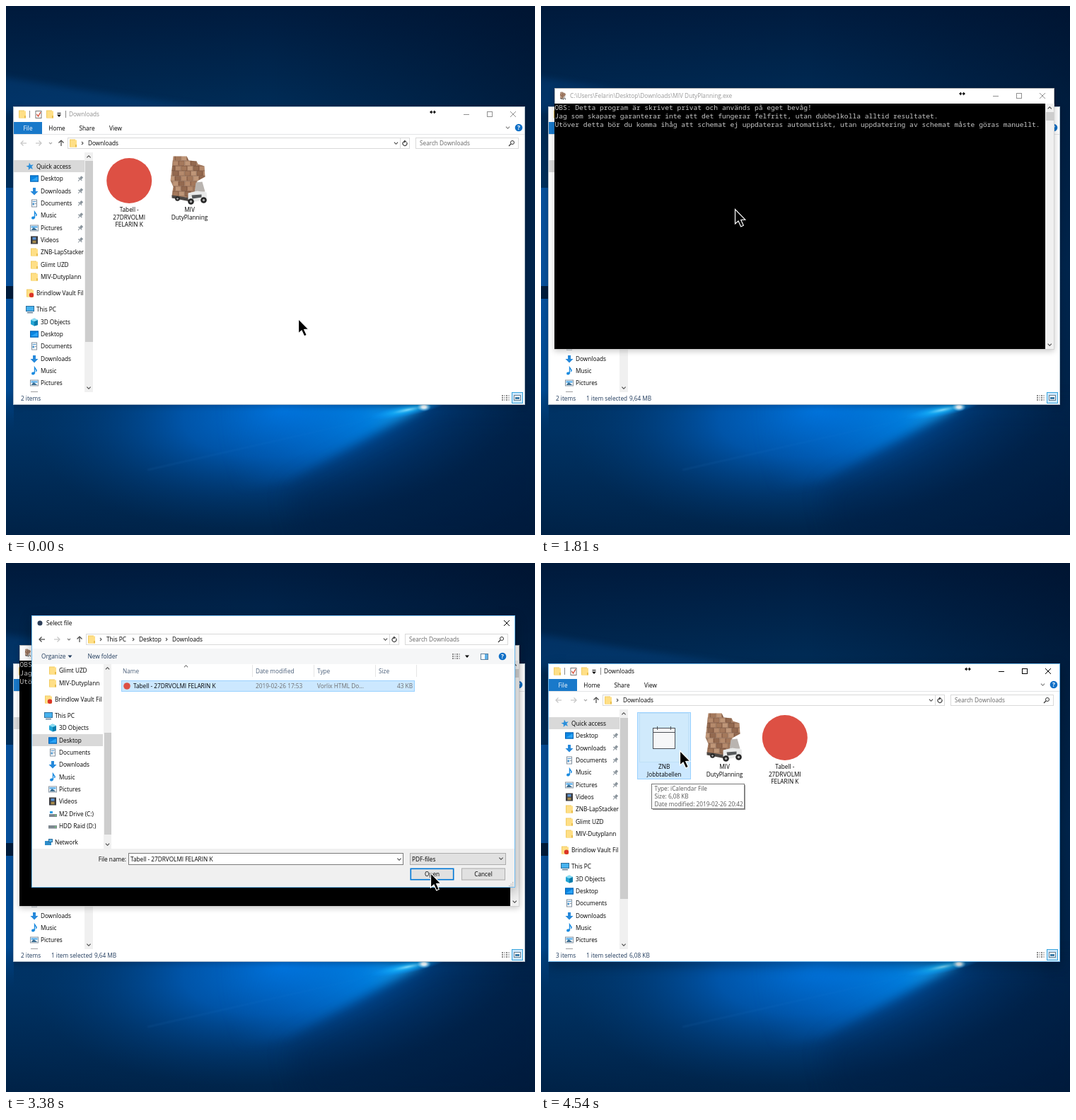
These frames come from a looping animation (748 px wide and 748 px high, 5710 ms). An HTML page with a canvas:

```html
<!DOCTYPE html>
<html lang="en">
<head>
<meta charset="utf-8">
<title>Downloads</title>
<style>
html, body { margin: 0; width: 100%; height: 100%; overflow: hidden; background: #001a3c; }
canvas { display: block; width: 748px; height: 748px; }
</style>
</head>
<body>
<canvas id="stage" width="748" height="748"></canvas>
<script>
const SIZE = 748, LOOP = 5710, STEP = 30;
const UI = '8.25px "Open Sans", "Noto Sans", sans-serif';
const MONO = '9.62px "Noto Sans Mono", "DejaVu Sans Mono", monospace';
const DOC = 'Tabell - 27DRVOLMI FELARIN K';
const SELECT = ['#cce8ff', '#99d1ff'], HOVER = ['#e5f3ff', '#e5f3ff'];
const INK = '#000', GREY = '#8f8f8f', ACCENT = '#6db9ee';
let ctx = document.getElementById('stage').getContext('2d');

// ---- drawing helpers ----
function rect(x, y, w, h, fill, stroke, lw = 1) {
  if (fill) { ctx.fillStyle = fill; ctx.fillRect(x, y, w, h); }
  if (stroke) {
    ctx.strokeStyle = stroke; ctx.lineWidth = lw;
    ctx.strokeRect(x + lw / 2, y + lw / 2, w - lw, h - lw);
  }
}
function trace(points, close) {
  ctx.beginPath();
  points.forEach(([x, y]) => ctx.lineTo(x, y));
  if (close) ctx.closePath();
}
function poly(points, fill) { trace(points, true); ctx.fillStyle = fill; ctx.fill(); }
function line(points, color, width = 1) {
  trace(points); ctx.strokeStyle = color; ctx.lineWidth = width; ctx.stroke();
}
function disc(x, y, r, fill) {
  ctx.beginPath(); ctx.arc(x, y, r, 0, 7); ctx.fillStyle = fill; ctx.fill();
}
function text(s, x, y, color = INK, align = 'left', font = UI) {
  ctx.font = font; ctx.fillStyle = color; ctx.textAlign = align;
  ctx.fillText(s, x, Math.round(y + 3));
}
function at(x, y, draw, angle = 0, scale = 1) {
  ctx.save(); ctx.translate(x, y); ctx.rotate(angle); ctx.scale(scale, scale); draw(); ctx.restore();
}
function clipTo(x, y, w, h, draw) {
  ctx.save(); ctx.beginPath(); ctx.rect(x, y, w, h); ctx.clip(); draw(); ctx.restore();
}
function chevron(x, y, turns = 0, color = '#444', r = 2.6) {
  at(x, y, () => line([[-r, -r / 2], [0, r / 2], [r, -r / 2]], color, 1.1), turns * Math.PI / 2);
}
function arrow(x, y, turns, color) {
  at(x, y, () => {
    line([[-4, 0], [4, 0]], color, 1.2);
    line([[-.5, -3.5], [-4, 0], [-.5, 3.5]], color, 1.2);
  }, turns * Math.PI / 2);
}
function triangle(x, y, color = INK) { poly([[x - 3, y - 1.5], [x + 3, y - 1.5], [x, y + 2]], color); }
function panel(x, y, w, h, border, strong) {
  ctx.save();
  ctx.shadowColor = `rgba(0,0,0,${strong ? .3 : .22})`;
  ctx.shadowBlur = strong ? 16 : 8;
  ctx.shadowOffsetY = strong ? 5 : 2;
  rect(x, y, w, h, '#fff');
  ctx.restore();
  rect(x, y, w, h, null, border);
}

// ---- wallpaper ----
function gradient(g, stops) { stops.forEach(([p, c]) => g.addColorStop(p, c)); return g; }
function glow(x, y, rx, ry, angle, stops) {
  at(x, y, () => {
    ctx.scale(1, ry / rx);
    ctx.fillStyle = gradient(ctx.createRadialGradient(0, 0, 0, 0, 0, rx), stops);
    ctx.fillRect(-rx, -rx, 2 * rx, 2 * rx);
  }, angle);
}
function beam(points, fill, blur) {
  ctx.filter = `blur(${blur}px)`; poly(points, fill); ctx.filter = 'none';
}
function paintWallpaper() {
  ctx.fillStyle = gradient(ctx.createLinearGradient(0, 0, 0, SIZE),
    [[0, '#001b3e'], [.18, '#002b55'], [.5, '#003a70'], [.8, '#00366a'], [1, '#00244a']]);
  ctx.fillRect(0, 0, SIZE, SIZE);
  ctx.fillStyle = gradient(ctx.createLinearGradient(0, 0, SIZE, 0),
    [[0, 'rgba(0,15,40,.1)'], [.5, 'rgba(0,15,40,0)'], [1, 'rgba(0,14,38,.5)']]);
  ctx.fillRect(0, 0, SIZE, SIZE);
  beam([[-20, 98], [130, 122], [330, 150], [-20, 150]], 'rgba(10,90,170,.26)', 5);

  glow(390, 570, 350, 165, -.12, [[0, 'rgba(0,116,222,.95)'], [.4, 'rgba(0,98,196,.7)'], [.75, 'rgba(0,74,150,.28)'], [1, 'rgba(0,60,120,0)']]);
  const fan = gradient(ctx.createRadialGradient(592, 567, 0, 592, 567, 290),
    [[0, 'rgba(40,190,255,.9)'], [.3, 'rgba(0,150,255,.6)'], [.65, 'rgba(0,125,235,.3)'], [1, 'rgba(0,100,200,0)']]);
  beam([[594, 566], [300, 555], [300, 690], [400, 670]], fan, 7);
  beam([[610, 570], [400, 685], [420, 770], [770, 770], [770, 570]], 'rgba(0,32,70,.3)', 16);
  beam([[592, 567], [200, 655], [200, 657]], 'rgba(80,180,255,.1)', 1);
  glow(568, 571, 56, 9, -.2, [[0, '#7fdcff'], [.4, 'rgba(20,180,255,.6)'], [1, 'rgba(0,140,255,0)']]);
  glow(591, 567, 10, 6, 0, [[0, '#fff'], [.3, '#e6f7ff'], [1, 'rgba(120,210,255,0)']]);

  rect(0, 257, 11, 139, '#07509b');
  rect(0, 396, 11, 18, '#001c3c');
  ctx.fillStyle = gradient(ctx.createLinearGradient(0, 414, 0, 600), [[0, '#06519d'], [.7, '#004a92'], [1, 'rgba(0,60,120,0)']]);
  ctx.fillRect(0, 414, 11, 186);
}
const wallpaper = document.createElement('canvas');
wallpaper.width = wallpaper.height = SIZE;
const stageCtx = ctx;
ctx = wallpaper.getContext('2d');
paintWallpaper();
ctx = stageCtx;

// ---- small icons, drawn around the origin ----
const icons = {
  folder() { rect(-5, -5.5, 8, 11, '#f2cc62'); rect(-4, -4.5, 9, 10, '#ffdf86'); rect(3, 2, 2, 3.5, '#e9bd4d'); },
  star() {
    poly(Array.from({ length: 10 }, (_, i) => {
      const r = i % 2 ? 2.3 : 5.5, a = i * Math.PI / 5 - .2;
      return [r * Math.sin(a), -r * Math.cos(a)];
    }), '#2b8fdb');
  },
  desktop() { rect(-6, -4.5, 12, 9, '#0a84e0', '#0764b4'); poly([[-5, 3], [5, -3], [5, 3]], '#2ba3f5'); },
  down() { poly([[-2, -5], [2, -5], [2, 0], [5.5, 0], [0, 5.5], [-5.5, 0], [-2, 0]], '#2689db'); },
  doc() {
    rect(-4, -5.5, 8, 11, '#fff', '#83919f');
    rect(-2.5, -3, 5, 1, '#4d94cc'); rect(-2.5, -.5, 2.5, 3, '#4d94cc'); rect(.8, 0, 2, 1, '#83919f');
  },
  music() {
    ctx.fillStyle = '#1a8be0';
    ctx.beginPath(); ctx.ellipse(-1.5, 3.5, 2.5, 2, -.3, 0, 7); ctx.fill();
    line([[.5, 3.5], [.5, -5], [3.2, -1], [2.5, 1]], '#1a8be0', 1.4);
  },
  picture() { rect(-6, -4.5, 12, 9, '#fff', '#8996a3'); rect(-4.5, -3, 9, 3, '#76bdf0'); poly([[-4.5, 3], [-1, -1], [4.5, 3]], '#3b6d91'); },
  video() { rect(-5, -5.5, 10, 11, '#3c3c40'); rect(-2.5, -4, 5, 3.5, '#5b94d2'); rect(-2.5, .7, 5, 3.5, '#a78b4a'); },
  cube() { poly([[-5, -3], [0, -5.5], [5, -3], [5, 4], [0, 5.5], [-5, 3]], '#23a5d5'); poly([[0, -1], [5, -3], [5, 4], [0, 5.5]], '#0c7cab'); poly([[-5, -3], [0, -5.5], [5, -3], [0, -1]], '#8bdcf2'); },
  pc() { rect(-6, -5, 12, 8, '#47b2ee', '#2b6f9e'); rect(-4, 4, 8, 1.3, '#53718a'); },
  disk() { rect(-5, 0, 11, 4, '#7d8790'); rect(3, 1.3, 2, 1.3, '#6ee36c'); rect(-4, -4, 4, 3, '#28a0e8'); },
  raid() { rect(-6, -1, 12, 4.5, '#7d8790'); rect(3, .5, 2, 1.3, '#6ee36c'); },
  network() { rect(-5, -2, 9, 6, '#2d8cc9'); rect(0, -5, 6, 5, '#5cb8ee', '#2c6d9b'); },
  synced() { icons.folder(); disc(2, 2.8, 3.2, '#da3327'); }
};
function icon(kind, x, y) { at(x, y, icons[kind]); }

// A cart loaded with parcels, 52 x 70 around the origin.
function cart() {
  const shades = ['#b58a6c', '#a4785b', '#bf9678', '#93694f'];
  ctx.save();
  trace([[-22, -34], [-3, -34], [0, -28], [11, -27], [13, -23], [22, -20], [23, -5], [12, 1], [10, 16], [2, 28], [-24, 22], [-22, 9], [-26, 0], [-24, -16]], true);
  ctx.clip();
  for (let row = 0; row < 9; row++) {
    for (let col = 0; col < 7; col++) {
      const x = -28 + col * 8.5 - (row % 2) * 3.5, y = -35 + row * 7.2;
      rect(x, y, 8.5, 7.2, shades[(row * 3 + col * 5 + (row >> 1)) % 4], 'rgba(95,60,42,.45)', .7);
    }
  }
  ctx.restore();
  poly([[10, 3], [19, 2], [23, 16], [8, 17]], '#b9b4b0');
  poly([[-24, 21], [2, 25], [2, 30], [-24, 25]], '#4b4643');
  poly([[-1, 18], [12, 15], [25, 17], [26, 27], [4, 31], [-1, 27]], '#e9eaea');
  poly([[4, 21], [18, 20], [18, 24], [5, 26]], '#55585a');
  [[-16, 26, 3.3], [3, 30, 4.3], [21, 28, 4.3]].forEach(([x, y, r]) => { disc(x, y, r, '#252525'); disc(x, y, r * .4, '#aaa'); });
}

// ---- shared window parts ----
function magnifier(x, y) {
  ctx.beginPath(); ctx.arc(x + 1, y - 1, 2.5, 0, 7);
  ctx.strokeStyle = '#333'; ctx.lineWidth = 1; ctx.stroke();
  line([[x - 1, y + 1], [x - 4, y + 4]], '#333', 1.3);
}
function help(x, y) { disc(x, y, 5.3, '#0f6fc6'); text('?', x, y, '#fff', 'center', 'bold ' + UI); }
function refresh(x, y) {
  ctx.beginPath(); ctx.arc(x, y + .5, 3, -.7, 4.4);
  ctx.strokeStyle = '#444'; ctx.lineWidth = 1.1; ctx.stroke();
  poly([[x - 1, y - 4.5], [x + 2.5, y - 2.5], [x - 1, y - .5]], '#444');
}
function closeMark(x, y, color) {
  line([[x - 4, y - 4], [x + 4, y + 4]], color); line([[x + 4, y - 4], [x - 4, y + 4]], color);
}
function windowButtons(x, y, color) {
  line([[x - 4, y + .5], [x + 4, y + .5]], color);
  rect(x + 29, y - 4, 8, 8, null, color);
  closeMark(x + 66, y, color);
  const rx = x - 47.5, ry = y - 3;
  line([[rx - 3, ry], [rx + 3, ry]], '#000');
  poly([[rx - 4.5, ry], [rx - 1.5, ry - 2.5], [rx - 1.5, ry + 2.5]], '#000');
  poly([[rx + 4.5, ry], [rx + 1.5, ry - 2.5], [rx + 1.5, ry + 2.5]], '#000');
}
function scrollBar(x, top, bottom, thumbTop, thumbBottom, w = 12) {
  rect(x, top, w, bottom - top, '#f0f0f0');
  rect(x + 1, thumbTop, w - 1, thumbBottom - thumbTop, '#cdcdcd');
  chevron(x + w / 2, top + 6, 2); chevron(x + w / 2, bottom - 6);
}
function listView(x, y) {
  for (let row = 0; row < 3; row++) {
    for (let col = 0; col < 2; col++) {
      rect(x + col * 6, y + row * 3, 2, 2, '#8a8a8a');
      rect(x + col * 6 + 3, y + row * 3 + .5, 2, 1, '#8a8a8a');
    }
  }
}
function addressBar(x, y, right, searchX, searchRight, path) {
  rect(x, y - 8, right - x, 16, '#fff', '#d9d9d9');
  icon('folder', x + 8, y);
  path.forEach(([label, px]) => { chevron(px - 8, y, 3, '#555', 2); text(label, px, y); });
  chevron(right - 19.5, y);
  line([[right - 13.5, y - 8], [right - 13.5, y + 8]], '#d9d9d9');
  refresh(right - 7, y);
  rect(searchX, y - 8, searchRight - searchX, 16, '#fff', '#d9d9d9');
  text('Search Downloads', searchX + 6, y, '#666');
  magnifier(searchRight - 10, y);
}

const PITCH = 17.37;
const group = (top, head, children) => [
  { kind: head[0], label: head[1], y: top, dx: 0 },
  ...children.map(([kind, label, pin], i) => ({ kind, label, pin, y: top + PITCH * (i + 1), dx: 6 }))
];
const places = [
  ...group(226.8, ['star', 'Quick access'], [
    ['desktop', 'Desktop', 1], ['down', 'Downloads', 1], ['doc', 'Documents', 1], ['music', 'Music', 1],
    ['picture', 'Pictures', 1], ['video', 'Videos', 1],
    ['folder', 'ZNB-LapStacker'], ['folder', 'Glimt UZD'], ['folder', 'MIV-Dutyplann']]),
  ...group(406.2, ['synced', 'Brindlow Vault Fil'], []),
  ...group(429.2, ['pc', 'This PC'], [
    ['cube', '3D Objects'], ['desktop', 'Desktop'], ['doc', 'Documents'], ['down', 'Downloads'], ['music', 'Music'],
    ['picture', 'Pictures'], ['video', 'Videos'], ['disk', 'M2 Drive (C:)'], ['raid', 'HDD Raid (D:)']]),
  ...group(608.5, ['network', 'Network'], [])
];
function sidebar(x, top, bottom, dx, dy, markedY) {
  clipTo(x, top, 100, bottom - top, () => {
    rect(x, Math.round(markedY - 8.5), 101, 17, '#d9d9d9');
    for (const p of places) {
      const y = p.y + dy;
      icon(p.kind, 34 + dx + p.dx, Math.round(y));
      text(p.label, 43 + dx + p.dx, y);
      if (p.pin) at(105 + dx, y, () => {
        rect(-1.5, -4, 3.5, 4, '#8a949c'); rect(-3, 0, 6.5, 1.2, '#8a949c'); line([[0, 1], [0, 4.5]], '#8a949c');
      }, .7);
    }
  });
}

// ---- file manager ----
const pdfItem = { lines: ['Tabell -', '27DRVOLMI', 'FELARIN K'], draw: x => disc(x, 247, 32, '#dd5044') };
const appItem = { lines: ['MIV', 'DutyPlanning'], draw: x => at(x - 1, 246.5, cart) };
const calendarItem = {
  lines: ['ZNB', 'Jobbtabellen'],
  draw(center, marked) {
    const x = Math.round(center), tone = '#4a4f55';
    rect(x - 35, 212, 70, 70, marked ? '#d0eafc' : '#fff', marked ? '#bfe0f6' : '#dedede');
    rect(x - 16, 233, 32, 30, '#f6f7f8', tone);
    line([[x - 16, 239.5], [x + 16, 239.5]], tone);
    [-9.5, 9.5].forEach(d => line([[x + d, 231], [x + d, 236]], tone));
  }
};
function explorer({ active, items, selected, hovered, size }) {
  const tools = selected >= 0 && items[selected] === appItem;
  const tone = active ? '#000' : GREY;
  panel(10, 142, 724, 422, active ? ACCENT : '#b4c3cf', active);

  icon('folder', 23, 153);
  rect(33, 148, 1, 10, '#888');
  rect(41.5, 148, 9, 11, '#fff', '#777'); line([[43.5, 153], [45.5, 156], [49, 150]], '#d2462f', 1.3);
  icon('folder', 62, 153);
  line([[72.5, 151.5], [77.5, 151.5]], INK); triangle(75, 155);
  rect(84, 148, 1, 10, '#888');
  if (tools) {
    rect(176, 144, 74, 20, '#efcdfc');
    line([[176.5, 164], [176.5, 176]], '#e4e4e4'); line([[249.5, 164], [249.5, 176]], '#e4e4e4');
    text('Application Tools', 213, 154.5, '#6b3c7a', 'center');
    text('Manage', 212, 173, INK, 'center');
  }
  text('Downloads', tools ? 259 : 89, 153, tone);
  windowButtons(651, 153, tone);

  rect(11, 164, 40, 17, '#1979ca');
  text('File', 31, 173, '#fff', 'center');
  [['Home', 72], ['Share', 114.5], ['View', 155]].forEach(([s, x]) => text(s, x, 173, INK, 'center'));
  rect(11, 181, 722, 1, '#e3e4e6');
  chevron(709.5, 172, 0, '#777'); help(725, 172);

  arrow(25, 194, 0, '#c5c5c5'); arrow(46, 194, 2, '#c5c5c5'); chevron(63, 194, 0, '#aaa', 2); arrow(78, 194, 1, '#444');
  addressBar(87, 194, 571, 579, 725, [['Downloads', 116]]);

  sidebar(11, 207, 546, 0, 0, 226.8);
  scrollBar(111, 207, 546, 219, 475);

  items.forEach((item, i) => {
    const x = 174.2 + i * 85.3, tint = i === selected ? SELECT : i === hovered ? HOVER : null;
    if (tint) rect(Math.round(x - 37.8), 211, 76, 95, ...tint);
    item.draw(x, !!tint);
    item.lines.forEach((s, n) => text(s, x, 288 + n * 10.7, INK, 'center'));
  });

  text(items.length + ' items', 21, 555, '#1e395b');
  if (selected >= 0) { text('1 item selected', 64, 555, '#1e395b'); text(size, 125, 555, '#1e395b'); }
  listView(701, 550);
  rect(715, 546, 16, 16, '#cce8ff', '#37a3dc');
  rect(718, 550, 10, 8, '#fff', '#667c8c'); rect(720, 553, 6, 3, '#3b7ba7');
}
function tooltip() {
  rect(158, 314, 131, 35, 'rgba(0,0,0,.4)');
  rect(156, 312, 132, 36, '#fff', '#767676');
  ['Type: iCalendar File', 'Size: 6,08 KB', 'Date modified: 2019-02-26 20:42']
    .forEach((s, i) => text(s, 160.5, 319 + i * 10.8, '#575757'));
}

// ---- console ----
function consoleWindow() {
  panel(19, 116, 707, 369.5, '#b4b4b4', false);
  at(31, 127, cart, 0, .16);
  text('C:\\Users\\Felarin\\Desktop\\Downloads\\MIV DutyPlanning.exe', 41, 127, '#999');
  windowButtons(643, 127, GREY);
  rect(19, 138, 694, 347, '#000');
  ['OBS: Detta program är skrivet privat och används på eget bevåg!',
    'Jag som skapare garanterar inte att det fungerar felfritt, utan dubbelkolla alltid resultatet.',
    'Utöver detta bör du komma ihåg att schemat ej uppdateras automatiskt, utan uppdatering av schemat måste göras manuellt.']
    .forEach((s, i) => text(s, 19.5, 144.4 + i * 11.6, '#c8c8c8', 'left', MONO));
  scrollBar(713, 138, 485, 150, 162, 12.5);
}

// ---- file dialog ----
function dialog(chosen, settled) {
  const steel = '#4c607a', navy = '#1e395b';
  panel(36, 74, 684, 385, ACCENT, settled);
  disc(48, 85, 3.5, '#2c3e58');
  text('Select file', 57, 85);
  closeMark(708, 85, '#000');
  arrow(51, 108, 0, '#444'); arrow(72, 108, 2, '#c5c5c5'); chevron(89, 108, 0, '#777', 2); arrow(104, 108, 1, '#444');
  addressBar(113, 108, 556, 564, 710, [['This PC', 142], ['Desktop', 188], ['Downloads', 235]]);

  rect(37, 121, 682, 22, '#f5f6f7');
  text('Organize', 50, 132, navy); triangle(90.5, 132, navy);
  text('New folder', 115.5, 132, navy);
  listView(631, 128);
  triangle(652, 132);
  rect(671, 128, 11, 9, '#fff', '#5e7f9a'); rect(677, 129, 4, 7, '#5fb0e8');
  help(702, 132);

  sidebar(37, 143, 404, 26, -213.3, 250.7);
  scrollBar(138, 143, 404, 240, 384, 11);

  [['Name', 165], ['Date modified', 353], ['Type', 440], ['Size', 527]].forEach(([s, x]) => text(s, x, 153, steel));
  [348, 435, 522, 580].forEach(x => rect(x, 144, 1, 17, '#e5e5e5'));
  chevron(254.5, 146, 2, '#777');
  if (chosen) rect(163, 166, 415, 16, ...SELECT);
  disc(171, 174, 4.8, '#dd5044');
  text(DOC, 180, 174);
  text('2019-02-26 17:53', 353, 174, '#6d6d6d');
  text('Vorlix HTML Do...', 440, 174, '#6d6d6d');
  text('43 KB', 575, 174, '#6d6d6d', 'right');

  rect(37, 404, 682, 54, '#f0f0f0');
  text('File name:', 170, 418.5, INK, 'right');
  rect(173, 410, 389, 17, '#fff', '#7a7a7a');
  if (chosen) text(DOC, 176, 418.5);
  chevron(556, 419);
  rect(571, 410, 136, 17, '#e1e1e1', '#adadad');
  text('PDF-files', 574, 418.5); chevron(700, 418);
  rect(571.5, 431.5, 62, 17, '#e1e1e1', '#0078d7', 1.6);
  text('Open', 602.5, 440, INK, 'center');
  rect(644, 431.5, 62, 17, '#e1e1e1', '#adadad');
  text('Cancel', 675, 440, INK, 'center');
  for (let i = 0; i < 3; i++) for (let j = 0; j <= i; j++) rect(716 - j * 2.5, 451 + i * 2.5, 1.4, 1.4, '#b5b5b5');
}

// ---- pointer ----
const moves = [
  { start: 70, steps: 29, to: [274, 287] },
  { start: 2250, steps: 13, to: [245, 172] },
  { start: 2780, steps: 21, to: [600, 438] },
  { start: 4180, steps: 13, to: [196, 265] }
];
function pointerAt(t) {
  let pos = [413, 442];
  for (const { start, steps, to } of moves) {
    if (t < start) break;
    const p = Math.min(Math.floor((t - start) / STEP) + 1, steps) / steps;
    pos = pos.map((v, i) => v + (to[i] - v) * p);
  }
  return pos;
}
function pointer([x, y]) {
  at(x, y, () => {
    trace([[.5, .5], [.5, 21], [5, 17], [8.7, 25], [12.3, 23.3], [8.7, 15.5], [14.8, 15.2]], true);
    ctx.fillStyle = '#000'; ctx.fill();
    ctx.strokeStyle = '#fff'; ctx.lineWidth = 1.2; ctx.stroke();
  });
}

function render(t) {
  const finished = t >= 4080;
  ctx.drawImage(wallpaper, 0, 0);
  explorer({
    active: finished || (t >= 910 && t < 1810),
    items: finished ? [calendarItem, appItem, pdfItem] : [pdfItem, appItem],
    selected: finished ? (t >= 4540 ? 0 : -1) : (t >= 910 ? 1 : -1),
    hovered: t >= 820 && t < 910 ? 1 : -1,
    size: finished ? '6,08 KB' : '9,64 MB'
  });
  if (t >= 4540) tooltip();
  if (t >= 1810 && !finished) consoleWindow();
  if (t >= 1980 && t < 3580) dialog(t >= 2610, t >= 2150);
  pointer(pointerAt(t));
}

const began = performance.now();
function tick() {
  render((performance.now() - began) % LOOP);
  requestAnimationFrame(tick);
}
tick();
</script>
</body>
</html>
```
